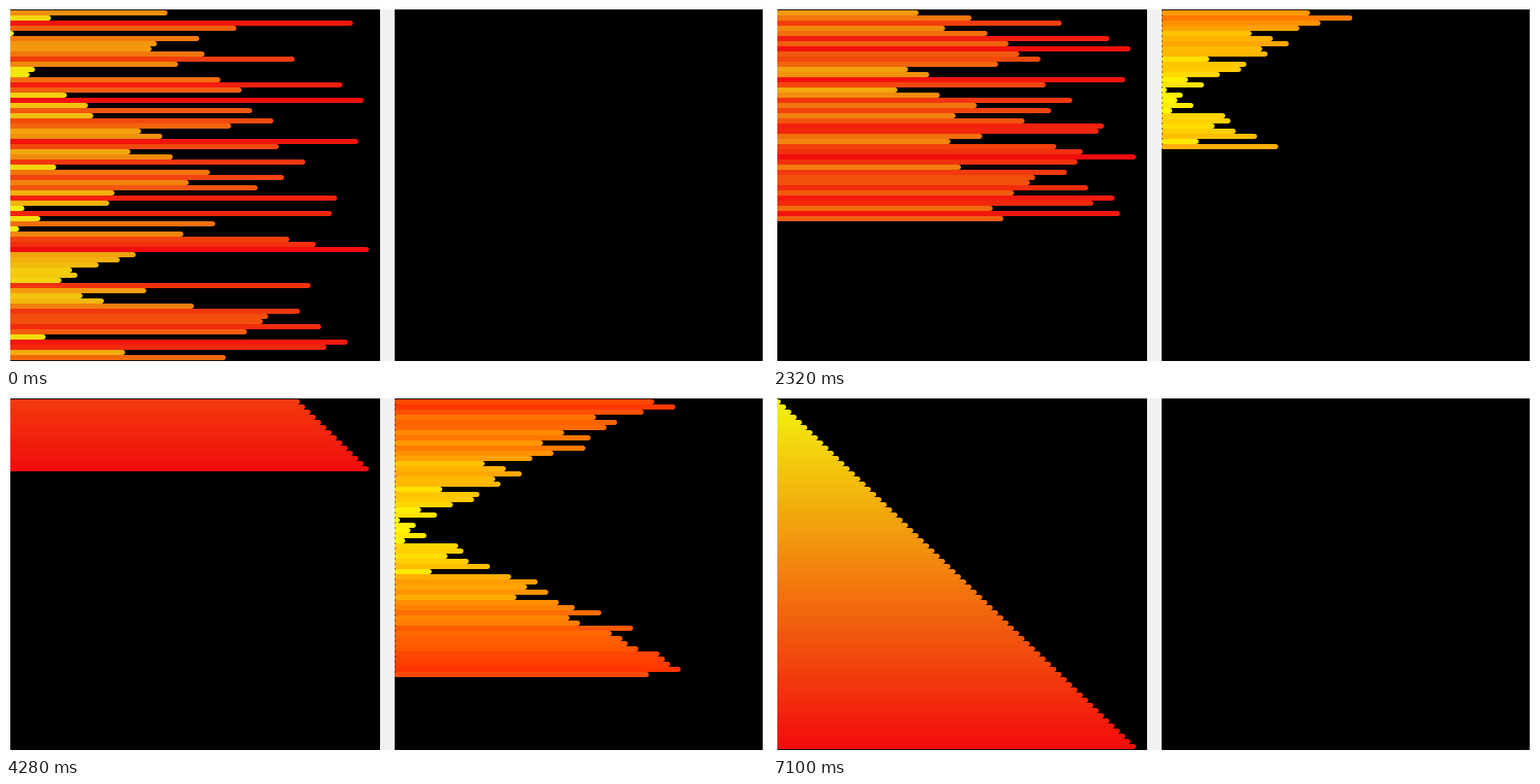
Recreate the animation shown at these times as a matplotlib script. Size 887 by 421 pixels, loop 7.23 s.

```python
import matplotlib.pyplot as plt
import numpy as np
from matplotlib.animation import FuncAnimation
from matplotlib.collections import LineCollection
from matplotlib.patches import Rectangle

W, H, DPI = 887, 421, 64
LOOP, TICK = 7230, 10
TOP, BOTTOM = 4, 414
ROW = 6

START = [
    29, 7, 64, 42, 0, 35, 27, 26, 36, 53, 31, 4, 3, 39, 62, 43, 10,
    66, 14, 45, 15, 49, 41, 24, 28, 65, 50, 22, 30, 55, 8, 37, 51, 33,
    46, 19, 61, 18, 2, 60, 5, 38, 1, 32, 52, 57, 67, 23, 20, 16, 11,
    12, 9, 56, 25, 13, 17, 34, 54, 48, 47, 58, 44, 6, 63, 59, 21, 40,
]
N = len(START)
UNIT = 420 / N

# Moments at which the picture refreshes, in ms
REFRESH = [980, *range(1060, 5190, 70), 5200, 5250,
           *range(5330, 6300, 70), 6300, 6370, 6440, 6510]
# Pace of the sort: time in ms against operations done
PACE_T = [960, 1480, 2320, 3090, 4280, 5200, 6500]
PACE_N = [0, 32.5, 85.5, 132.5, 205.5, 263.5, 343.5]


def sort_states(values):
    """Two-stack sort; returns both stacks after every operation."""
    a, b = list(values), []
    states = [(a[:], b[:])]

    def log():
        states.append((a[:], b[:]))

    def push(src, dst):
        dst.insert(0, src.pop(0))
        log()

    def rotate(stack):
        stack.append(stack.pop(0))
        log()

    def rotate_back(stack):
        stack.insert(0, stack.pop())
        log()

    span = int(1.4 * N ** 0.5)
    done = 0
    while a:
        head = a[0]
        if head > done + span:
            rotate(a)
            continue
        push(a, b)
        if head <= done:
            rotate(b)
        done += 1

    while b:
        top = max(b)
        turn = rotate if b.index(top) <= len(b) // 2 else rotate_back
        while b[0] != top:
            turn(b)
        push(b, a)
    return states


class Panel:
    def __init__(self, fig, left, right, origin, low, high):
        self.origin, self.low, self.high = origin, low, high
        height = BOTTOM - TOP
        ax = fig.add_axes([left / W, 1 - BOTTOM / H,
                           (right - left) / W, height / H])
        ax.set(xlim=(left, right), ylim=(BOTTOM, TOP))
        ax.axis("off")
        ax.add_patch(Rectangle((left, TOP), right - left, height,
                               color="black", lw=0))
        self.bars = LineCollection([], linewidths=ROW * 72 / DPI,
                                   capstyle="round", snap=False)
        ax.add_collection(self.bars, autolim=False)

    def color(self, value):
        green = self.high + (self.low - self.high) * value / (N - 1)
        return self.high, green, self.low

    def bar(self, row, value):
        y = TOP + 4 + ROW * row
        return [(self.origin + 5, y), (self.origin + (value + 1) * UNIT, y)]

    def show(self, stack):
        self.bars.set_segments([self.bar(i, v) for i, v in enumerate(stack)])
        self.bars.set_color([self.color(v) for v in stack])


states = sort_states(START)

fig = plt.figure(figsize=(W / DPI, H / DPI), dpi=DPI, facecolor="white")
fig.add_artist(Rectangle((436 / W, 1 - BOTTOM / H), 17 / W,
                         (BOTTOM - TOP) / H, color="#f2f1f0", lw=0))
panels = (Panel(fig, 5, 436, 0, 0.05, 0.95),
          Panel(fig, 453, 882, 450, 0.0, 1.0))


def update(frame):
    shown = np.searchsorted(REFRESH, frame * TICK, side="right")
    ops = int(np.interp(REFRESH[shown - 1], PACE_T, PACE_N)) if shown else 0
    for panel, stack in zip(panels, states[min(ops, len(states) - 1)]):
        panel.show(stack)
    return [panel.bars for panel in panels]


anim = FuncAnimation(fig, update, frames=LOOP // TICK, interval=TICK,
                     repeat=True, repeat_delay=0)
plt.show()
```
